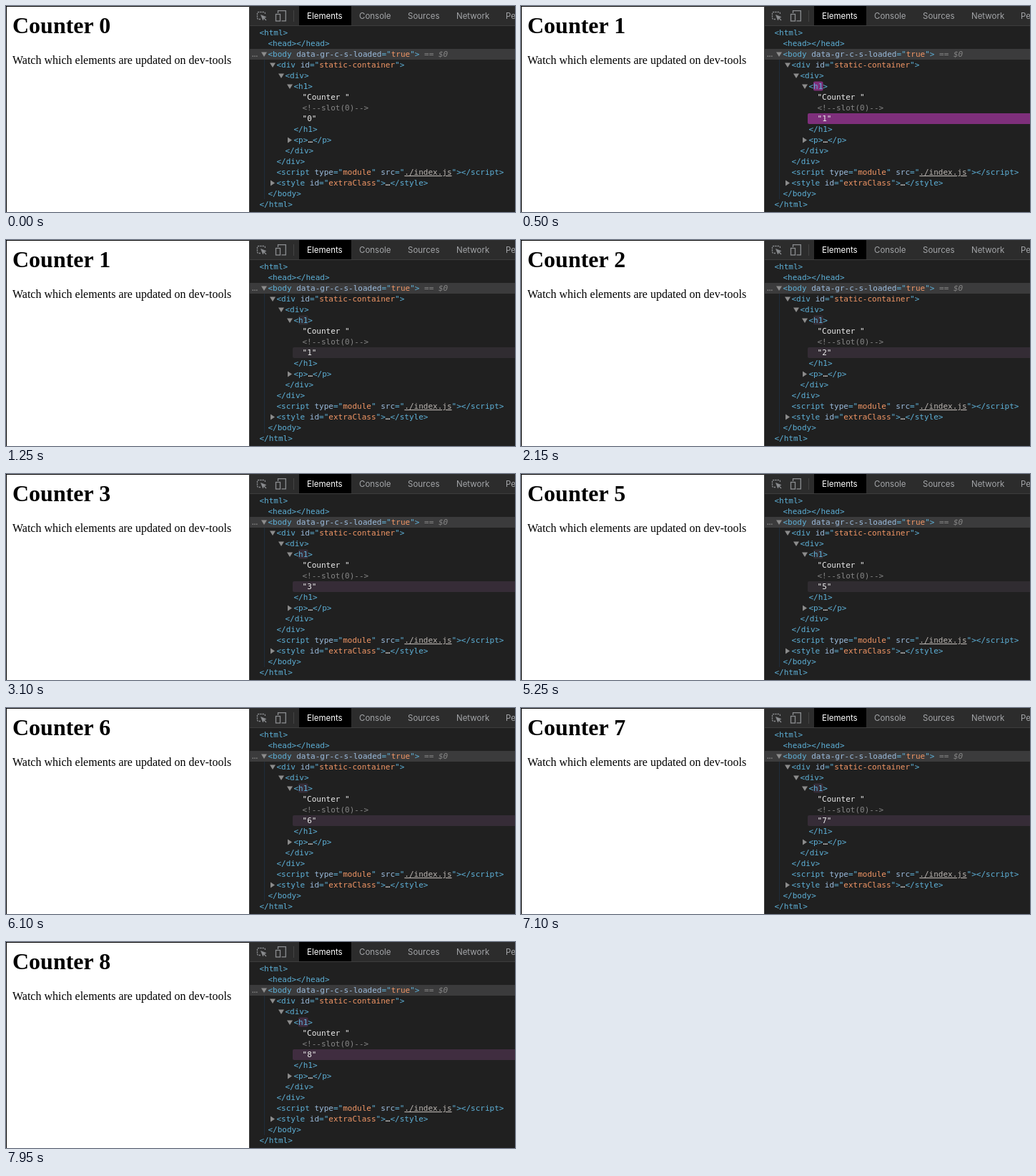
Recreate the animation shown at these times as an HTML page. Size 712 px wide and 288 px high, loop 8000 ms.

```html
<!DOCTYPE html>
<html lang="en">
<head>
<meta charset="utf-8">
<title>Counter and element inspector</title>
<style>
  html, body { margin: 0; width: 100%; height: 100%; overflow: hidden; background: #fff; }
  svg { display: block; width: 712px; height: 288px; }
  text { white-space: pre; }

  .page { font: 16px "Liberation Serif", serif; fill: #000; }
  .page .title { font-size: 32px; font-weight: bold; }

  .tabs { font: 11.5px Inter, sans-serif; fill: #a3a5a8; }
  .tabs .active { fill: #fff; }
  .icon { fill: none; stroke: #8b8d90; stroke-width: 1.3; }

  .tree { font: 11px "DejaVu Sans Mono", monospace; fill: #5db0d7; }
  .name { fill: #9bbbdc; }
  .value { fill: #f29766; }
  .link { fill: #b9b4b0; text-decoration: underline; }
  .string { fill: #ececec; }
  .note { fill: #858585; }
  .arrow { fill: #8c8c8c; }

  /* Paused; the script picks the moment through --age. */
  .flash {
    fill: transparent;
    animation: flash 1.4s cubic-bezier(0, 0, .2, 1) paused;
    animation-delay: calc(var(--age, -1) * -1ms);
  }
  @keyframes flash {
    from { fill: rgb(145, 48, 141); }
    80% { fill: rgb(44, 44, 45); }
    to { fill: transparent; }
  }
</style>
</head>
<body>
<svg id="stage" viewBox="0 0 712 288">
  <defs>
    <path id="open" class="arrow" d="M-4-3H4L0 3.5Z"/>
    <path id="closed" class="arrow" d="M-2.5-4V4L3.5 0Z"/>
  </defs>

  <rect width="712" height="288"/>
  <rect x="1" y="1" width="339" height="287" fill="#fff"/>
  <g class="page">
    <text class="title" x="9" y="38">Counter <tspan id="pageCount">0</tspan></text>
    <text x="9" y="81">Watch which elements are updated on dev-tools</text>
  </g>

  <rect x="340" width="372" height="288" fill="#202020"/>
  <rect x="340" width="372" height="28" fill="#2c2c2c"/>
  <rect x="340" y="27" width="372" height="1" fill="#3d3d3d"/>
  <rect x="340" width="1" height="288" fill="#3a3a3a"/>
  <rect x="402" y="6" width="1" height="16" fill="#434343"/>
  <rect x="410" width="73" height="27"/>
  <g class="icon">
    <path d="M356 18.5H353.5Q351.500 18.500 351.500 16.500V10.500Q351.500 8.500 353.500 8.500H360.500Q362.500 8.500 362.500 10.500V12" stroke-dasharray="2.200 1"/>
    <path d="M356.500 12.500L364 15.500L360.700 16.700L359.500 20Z" fill="#8b8d90" stroke-width=".6"/>
    <path d="M360.500 16.500L364 20"/>
    <path d="M380.500 10V6.700H391.300V20.800H385.500"/>
    <rect x="377.500" y="11.500" width="6" height="9.500"/>
  </g>
  <g class="tabs">
    <text class="active" x="421" y="18">Elements</text>
    <text x="494" y="18">Console</text>
    <text x="562" y="18">Sources</text>
    <text x="630" y="18">Network</text>
    <text x="699" y="18">Performance</text>
  </g>

  <rect x="341" y="60" width="371" height="15" fill="#3b3b3c"/>
  <rect x="361" y="75" width="1" height="195" fill="#1e2c3c"/>
  <rect class="flash" x="409" y="105.500" width="13.500" height="13" rx="2"/>
  <rect class="flash" x="401" y="150" width="313" height="15" rx="2"/>

  <use href="#open" x="361" y="67.500"/>
  <use href="#open" x="373" y="82.500"/>
  <use href="#open" x="385" y="97.500"/>
  <use href="#open" x="397" y="112.500"/>
  <use href="#closed" x="396.500" y="187.500"/>
  <use href="#closed" x="372.500" y="247.500"/>

  <g class="tree">
    <text x="354.500" y="41">&lt;html&gt;</text>
    <text x="366.500" y="56">&lt;head&gt;&lt;/head&gt;</text>
    <text class="note" x="342" y="71" textLength="12">...</text>
    <text x="366.500" y="71">&lt;body <tspan class="name">data-gr-c-s-loaded</tspan>="<tspan class="value">true</tspan>"&gt;<tspan class="note"> == <tspan font-style="italic">$0</tspan></tspan></text>
    <text x="378.500" y="86">&lt;div <tspan class="name">id</tspan>="<tspan class="value">static-container</tspan>"&gt;</text>
    <text x="390.500" y="101">&lt;div&gt;</text>
    <text x="402.500" y="116">&lt;h1&gt;</text>
    <text class="string" x="414.500" y="131">"Counter "</text>
    <text class="note" x="414.500" y="146">&lt;!--slot(0)--&gt;</text>
    <text class="string" x="414.500" y="161">"<tspan id="treeCount">0</tspan>"</text>
    <text x="402.500" y="176">&lt;/h1&gt;</text>
    <text x="402.500" y="191">&lt;p&gt;<tspan class="string">…</tspan>&lt;/p&gt;</text>
    <text x="390.500" y="206">&lt;/div&gt;</text>
    <text x="378.500" y="221">&lt;/div&gt;</text>
    <text x="378.500" y="236">&lt;script <tspan class="name">type</tspan>="<tspan class="value">module</tspan>" <tspan class="name">src</tspan>="<tspan class="link">./index.js</tspan>"&gt;&lt;/script&gt;</text>
    <text x="378.500" y="251">&lt;style <tspan class="name">id</tspan>="<tspan class="value">extraClass</tspan>"&gt;<tspan class="string">…</tspan>&lt;/style&gt;</text>
    <text x="366.500" y="266">&lt;/body&gt;</text>
    <text x="354.500" y="281">&lt;/html&gt;</text>
  </g>
</svg>
<script>
  const LOOP = 8000, TICK = 1000;
  const PAGE_START = 380, TREE_START = 440; // the inspector lags behind the page
  const byId = id => document.getElementById(id);
  const stage = byId('stage'), pageCount = byId('pageCount'), treeCount = byId('treeCount');

  const ticks = (time, start) => Math.floor((time - start) / TICK) + 1;

  function setText(node, value) {
    if (node.textContent !== String(value)) node.textContent = value;
  }

  function render(now) {
    const time = now % LOOP;
    const count = ticks(time, TREE_START);
    setText(pageCount, ticks(time, PAGE_START));
    setText(treeCount, count);
    stage.style.setProperty('--age', count ? (time - TREE_START) % TICK : -1);
    requestAnimationFrame(render);
  }
  requestAnimationFrame(render);
</script>
</body>
</html>
```
